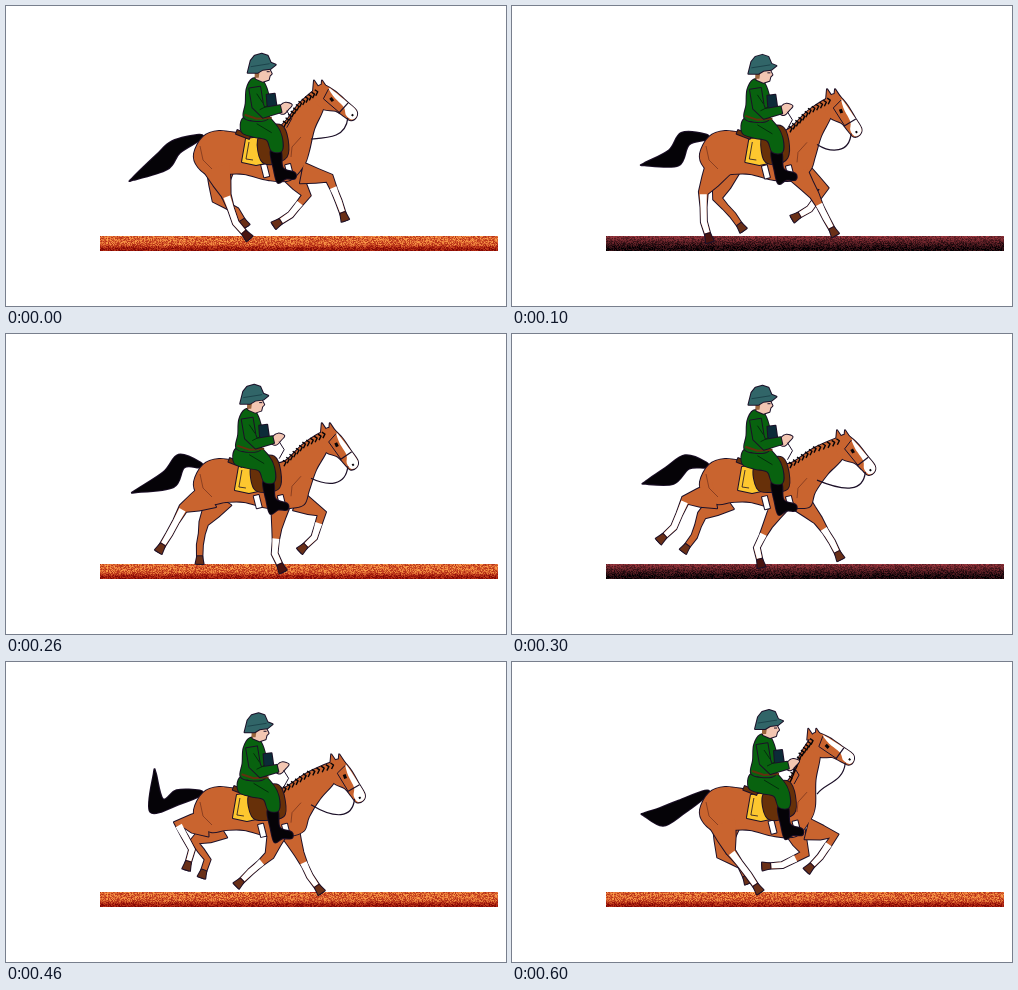
Recreate the animation shown at these times as an HTML page with a canvas. Size 500 by 300 pixels, loop 0.7 s.

```html
<!DOCTYPE html>
<html lang="en">
<head>
<meta charset="utf-8">
<title>Galloping rider</title>
<style>
html, body { margin: 0; width: 100%; height: 100%; overflow: hidden; background: #fff; }
canvas { display: block; }
</style>
</head>
<body>
<canvas id="stage" width="500" height="300"></canvas>
<script>
const ctx = document.getElementById('stage').getContext('2d');
const STEP = 100, STEPS = 7;
const COAT = '#c9642f', INK = '#1c1028', GREEN = '#08620f', BLACK = '#050307', SKIN = '#f3c6b2';

// Every moving part is a mean plus one or two harmonics of the stride.
const wave = (t, mean, a, b, c = 0, d = 0) => mean + a * Math.cos(t) + b * Math.sin(t)
  + c * Math.cos(2 * t) + d * Math.sin(2 * t);

// Swing of thigh, cannon and pastern in degrees from straight down
const legs = {
  hindNear: { hip: [209, 161], slide: .08, size: [30, 29, 21],
    swing: [[-39, 53, -14, 5, -13], [13, 9, -38, -3, 12], [2, 38, -21, 1, 8]] },
  hindFar: { hip: [214, 164], slide: 0, size: [30, 22, 19],
    swing: [[-30, 27, -1, -3, -3], [35, 28, -34, -2, 17], [7, 33, -4, -8, 9]] },
  foreNear: { hip: [277, 167], slide: .24, size: [28, 25, 20],
    swing: [[23, 54, -20, 2, -4], [-19, 29, 34, 12, 4], [-13, 15, 55, 17, -7]] },
  foreFar: { hip: [277, 167], slide: .24, size: [27, 25, 20],
    swing: [[37, 1, 22, -4, -1], [-20, -40, 14, 21, 3], [-34, -52, 6, 29, 9]] }
};

const add = (p, x, y) => [p[0] + x, p[1] + y];
const mix = (a, b, t) => [a[0] + (b[0] - a[0]) * t, a[1] + (b[1] - a[1]) * t];

function joints(leg, t) {
  const angles = leg.swing.map(s => wave(t, ...s));
  const pts = [add(leg.hip, leg.slide * angles[0], 0)];
  angles.forEach((deg, i) => {
    const a = deg * Math.PI / 180;
    pts.push(add(pts[i], leg.size[i] * Math.sin(a), leg.size[i] * Math.cos(a)));
  });
  return pts;
}

function pose(t) {
  const withers = [279, wave(t, 122, -6, 4)];
  const p = {
    rump: [188, 148], withers, chest: add(withers, 24, 29),
    poll: [wave(t, 319, -10, 7, 5, 4), wave(t, 90.5, -11, 8, 3, 2)],
    tilt: wave(t, 47, -7, 5, -2, 8) * Math.PI / 180,
    rider: [wave(t, -3.3, 2, -3.5, 1, -.6), wave(t, .7, -2, .5)],
    cloth: wave(t, 231, 5, -1),
    tail: [[194, 131],
      [wave(t, 172, -2, 3), wave(t, 136, 5, -8)],
      [wave(t, 155, 1, 8), wave(t, 149, 7, -2)],
      [wave(t, 136, -7, -7, -2, 6), wave(t, 144, 21, 20, 8, -13)]]
  };
  for (const name in legs) p[name] = joints(legs[name], t);
  return p;
}

function poly(pts, open) {
  const path = new Path2D();
  pts.forEach(p => path.lineTo(p[0], p[1]));
  if (!open) path.closePath();
  return path;
}

// Closed curve through every point
function blob(pts) {
  const path = new Path2D(), n = pts.length, at = i => pts[(i + n) % n];
  path.moveTo(...pts[0]);
  for (let i = 0; i < n; i++) {
    const [a, b, c, d] = [at(i - 1), at(i), at(i + 1), at(i + 2)];
    path.bezierCurveTo(b[0] + (c[0] - a[0]) / 6, b[1] + (c[1] - a[1]) / 6,
      c[0] - (d[0] - b[0]) / 6, c[1] - (d[1] - b[1]) / 6, c[0], c[1]);
  }
  path.closePath();
  return path;
}

function strip(pts, widths, shape = poly) {
  const left = [], right = [];
  pts.forEach((p, i) => {
    const a = pts[Math.max(0, i - 1)], b = pts[Math.min(pts.length - 1, i + 1)];
    const len = Math.hypot(b[0] - a[0], b[1] - a[1]) || 1;
    const nx = -(b[1] - a[1]) / len * widths[i] / 2, ny = (b[0] - a[0]) / len * widths[i] / 2;
    left.push(add(p, nx, ny));
    right.unshift(add(p, -nx, -ny));
  });
  return shape(left.concat(right));
}

function line(path, width = 1, color = INK) {
  ctx.lineWidth = width;
  ctx.strokeStyle = color;
  ctx.stroke(path);
}

function fill(path, color) {
  ctx.fillStyle = color;
  ctx.fill(path);
}

function inked(path, color) {
  line(path, 2);
  fill(path, color);
}

function legShape(j, hind) {
  const pts = [j[0], mix(j[0], j[1], .55), j[1], mix(j[1], j[2], .5), j[2], j[3]];
  return strip(pts, hind ? [27, 18, 9, 6, 6, 5] : [21, 14, 9, 6, 6, 5]);
}

function legTrim(j, hind, white) {
  if (white) {
    const start = mix(j[1], j[2], hind ? .05 : .4);
    fill(strip([start, mix(start, j[2], .5), j[2], mix(j[2], j[3], .55)], [7, 6, 6, 5]), '#fff');
  }
  inked(strip([mix(j[2], j[3], .6), j[3]], [5, 8]), j[3][1] > 232 ? '#4a1410' : '#6a3018');
}

function farLeg(j, hind) {
  inked(legShape(j, hind), COAT);
  legTrim(j, hind, !hind);
}

function drawHorse(p) {
  const R = p.rump, W = p.withers, C = p.chest, cos = Math.cos(p.tilt), sin = Math.sin(p.tilt);
  const h = (x, y) => add(p.poll, x * cos - y * sin, x * sin + y * cos);
  const crest = add(mix(W, p.poll, .5), -2, -3);
  const throat = h(14, 12);

  inked(strip(p.tail, [5, 14, 18, 2], blob), BLACK);
  farLeg(p.hindFar, true);
  farLeg(p.foreFar, false);

  const body = blob([R, add(R, 9, -17), add(R, 25, -23), [238, 128], [262, 129], W, crest, h(0, -2),
    throat, add(mix(throat, C, .5), -2, 0), C, add(C, -5, 14), [284, 174], [262, 174],
    [238, 168], [220, 168], add(R, 17, 22), add(R, 4, 13)]);
  const head = blob([h(-1, -4), h(13, -7), h(30, -6), h(42, -5), h(46, 0), h(44, 6), h(36, 7),
    h(26, 8), h(16, 14), h(6, 14), h(-2, 7)]);
  const ears = [-5, 3].map(x =>
    poly([add(p.poll, x - 2, 3), add(p.poll, x - 1, -8), add(p.poll, x + 5, 1)]));
  const parts = [body, head, ...ears, legShape(p.hindNear, true), legShape(p.foreNear, false)];
  parts.forEach(x => line(x, 2));
  parts.forEach(x => fill(x, COAT));
  legTrim(p.hindNear, true, true);
  legTrim(p.foreNear, false, true);

  // Muscle lines
  line(poly([add(R, 6, -8), add(R, 9, 6), add(R, 18, 15)], true), .7, '#70301c');
  line(poly([add(C, -8, -14), add(C, -17, -4), add(C, -18, 6)], true), .7, '#70301c');

  // Mane
  for (let i = 0; i < 12; i++) {
    const root = i < 6 ? mix(W, crest, i / 6) : mix(crest, p.poll, (i - 6) / 6);
    line(poly([add(root, -2, -1), add(root, 1, 1), add(root, -1, 5)], true), 1.4, BLACK);
  }

  // Face and bridle
  fill(blob([h(7, -6), h(28, -6), h(42, -5), h(46, 0), h(44, 5), h(37, 5), h(30, 0), h(16, -2)]), '#fff');
  fill(strip([h(14, 1), h(18, 2)], [3, 3]), BLACK);
  fill(strip([h(41, 1), h(43, 1)], [2, 2]), BLACK);
  line(poly([h(31, -6), h(30, 8)], true), 1.2);
  line(poly([h(7, -5), h(9, 6), h(30, 7)], true), 1);

  const bit = h(40, 6), end = add(C, 2, -12), rein = new Path2D();
  rein.moveTo(...bit);
  rein.bezierCurveTo(bit[0] - 2, bit[1] + 20, bit[0] - 20, bit[1] + 20, end[0], end[1]);
  line(rein, 1.2);
}

function drawSaddle(p) {
  const x = p.cloth, [dx, dy] = p.rider;
  for (const gx of [258, 282]) {
    inked(strip([[gx + dx, 160 + dy], [gx + dx + 3, 172 + dy]], [5, 5]), '#fff');
  }
  inked(poly([[x + 4, 133], [x + 25, 130], [x + 28, 156], [x + 14, 159], [x, 156]]), '#fdc72f');
  line(poly([[x + 7, 136], [x + 4, 153], [x + 11, 154]], true), .8);
  inked(blob([[x + 16, 134], [262 + dx, 122 + dy], [276 + dx, 121 + dy], [282 + dx, 135 + dy],
    [281 + dx, 152 + dy], [x + 30, 158], [x + 19, 154]]), '#673009');
  inked(strip([[231 + dx, 126], [244 + dx, 131]], [4, 4]), '#673009');
}

function drawRider(p) {
  ctx.save();
  ctx.translate(...p.rider);
  // Leg and boot
  inked(blob([[265, 146], [275, 146], [277, 163], [289, 168], [289, 174], [280, 174], [272, 178], [268, 164]]), BLACK);
  inked(blob([[238, 113], [258, 110], [270, 120], [276, 132], [276, 146], [266, 146], [261, 135],
    [248, 132], [236, 127]]), GREEN);
  // Coat
  inked(blob([[247, 74], [256, 75], [261, 84], [264, 98], [262, 114], [248, 116], [238, 112],
    [240, 99], [241, 84]]), GREEN);
  inked(poly([[261, 90], [269, 89], [271, 103], [262, 103]]), '#0c2b38');
  line(poly([[239, 110], [251, 114], [266, 113]], true), 2, '#62300f');
  inked(blob([[275, 101], [280, 98], [286, 100], [283, 104], [278, 109], [273, 107]]), SKIN);
  inked(strip([[249, 83], [252, 101], [258, 108], [275, 104]], [11, 11, 10, 7]), GREEN);
  for (const [a, b] of [[[251, 89], [257, 98]], [[254, 105], [262, 101]], [[251, 119], [266, 128]]]) {
    line(poly([a, b], true), 1, '#032d0c');
  }
  line(poly([[281, 106], [286, 114], [281, 123]], true), 1);
  // Head and helmet
  inked(poly([[251, 65], [263, 63], [266, 69], [264, 71], [263, 75], [257, 77], [250, 74]]), SKIN);
  fill(poly([[249, 66], [254, 66], [253, 73], [249, 73]]), '#9b653c');
  line(poly([[261, 67], [264, 67]], true), 1);
  inked(poly([[242, 68], [245, 56], [249, 51], [256, 49], [262, 51], [265, 58], [270, 60], [265, 64],
    [257, 65], [252, 68]]), '#316568');
  line(poly([[245, 62], [264, 59]], true), .8, '#173c44');
  ctx.restore();
}

// Grainy track, in a bright and a dull version
function makeTrack(bright) {
  const c = document.createElement('canvas'), g = c.getContext('2d');
  c.width = 398;
  c.height = 15;
  let seed = 7;
  const rnd = () => (seed = seed * 16807 % 2147483647) / 2147483647;
  for (let y = 0; y < 15; y++) {
    const base = bright ? .68 - .36 / (1 + Math.exp(10 - y)) : Math.max(.05, .58 - y * .045);
    for (let x = 0; x < 398; x++) {
      const b = base + (rnd() - .5) * .4;
      g.fillStyle = bright
        ? `rgb(${95 + 180 * b},${210 * b * b},${100 * b * b})`
        : `rgb(${18 + 190 * b},${4 + 70 * b},${8 + 75 * b})`;
      g.fillRect(x, y, 1, 1);
    }
  }
  return c;
}

const tracks = [makeTrack(true), makeTrack(false)];
let shown = -1;

function draw(i) {
  const p = pose(i / STEPS * 2 * Math.PI);
  ctx.fillStyle = '#fff';
  ctx.fillRect(0, 0, 500, 300);
  ctx.drawImage(tracks[i % 2], 94, 230);
  ctx.lineJoin = 'round';
  drawHorse(p);
  drawSaddle(p);
  drawRider(p);
}

const began = performance.now();
function tick() {
  const i = Math.floor((performance.now() - began) / STEP) % STEPS;
  if (i !== shown) draw(shown = i);
  requestAnimationFrame(tick);
}
tick();
</script>
</body>
</html>
```
